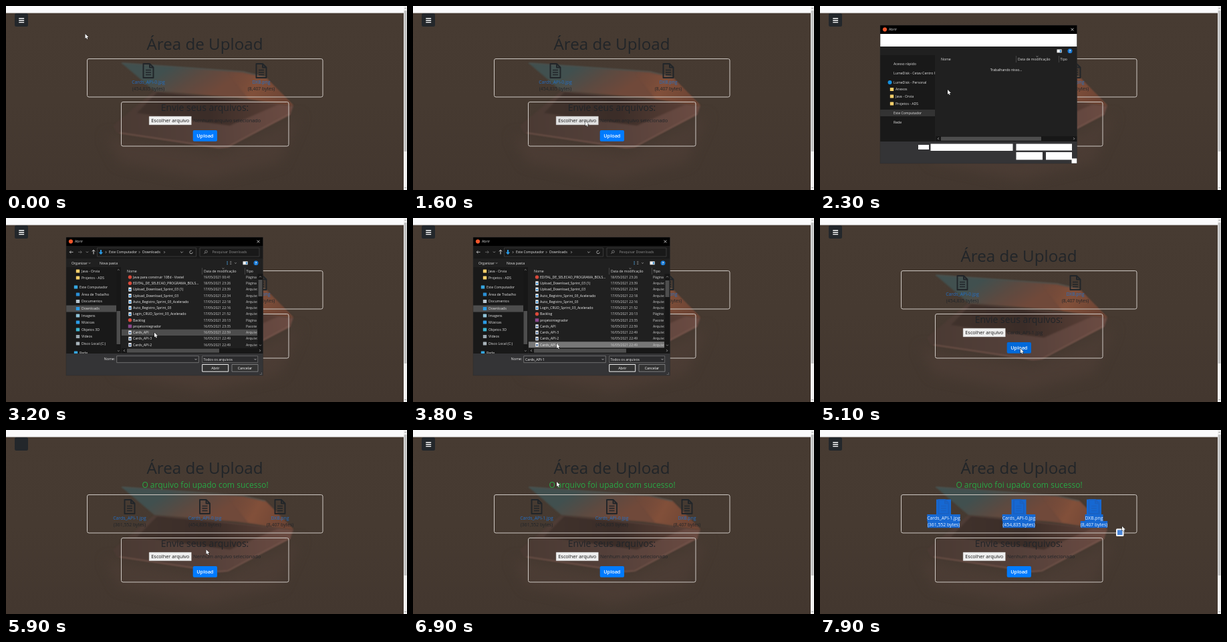
Recreate the animation shown at these times as an HTML page with a canvas. Size 600 by 277 pixels, loop 8 s.

```html
<!DOCTYPE html>
<html lang="pt-BR">
<head>
<meta charset="utf-8">
<title>Área de Upload</title>
<style>
  html, body { margin: 0; width: 100%; height: 100%; overflow: hidden; background: #463a31; }
  canvas { display: block; width: 600px; height: 277px; }
</style>
</head>
<body>
<canvas id="stage" width="600" height="277"></canvas>
<script>
const LOOP = 8000, STEP = 100;
const OPEN = 2000, CONTROLS = 2500, LISTED = 2800, CLOSE = 4200, CHOSEN = 4600, UPLOADED = 5800;
const INK = '#212529', SELECT = '#1668d2';
const canvas = document.getElementById('stage');
let c = canvas.getContext('2d');

// time, x, y of the pointer tip
const POINTER = [
  [0, 118.5, 42], [300, 97, 32], [900, 192, 100], [1400, 258, 173.5], [1900, 258, 173.5],
  [2300, 191, 126], [2700, 191, 126], [3200, 222, 172.5], [3500, 222, 174], [3700, 215, 189],
  [3800, 215, 189], [4100, 315, 223], [4300, 315.5, 220], [4900, 300, 197], [5700, 299, 194],
  [5900, 299.5, 180], [6600, 425, 135], [6900, 215, 78], [7000, 215, 78], [7300, 144, 100],
  [7700, 452, 145], [LOOP, 452, 145]
];

// name | date | type | icon
const FILES = `Java para construir 10Ed - Vostel|19/05/2021 00:41|Página|web
EDITAL_DE_SELECAO_PROGRAMA_BOLS...|18/05/2021 23:26|Página|web
Upload_Download_Sprint_03 (1)|17/05/2021 23:39|Arquivo|video
Upload_Download_Sprint_03|17/05/2021 22:34|Arquivo|video
Auto_Registro_Sprint_03_Acelerado|17/05/2021 22:18|Arquivo|video
Auto_Registro_Sprint_03|17/05/2021 22:16|Arquivo|video
Login_CRUD_Sprint_03_Acelerado|17/05/2021 21:52|Arquivo|video
Backlog|17/05/2021 20:13|Página|web
projetointegrador|16/05/2021 23:35|Pacote|zip
Cards_API|16/05/2021 22:59|Arquivo|image
Cards_API-3|16/05/2021 22:49|Arquivo|image
Cards_API-2|16/05/2021 22:49|Arquivo|image
Cards_API-1|16/05/2021 22:49|Arquivo|image`.split('\n').map(line => line.split('|'));

// label, x, y, icon colour
const PLACES_LOADING = [
  ['Acesso rápido', 110, 87], ['LumeDisk - Cetav Centro Paulo', 110, 101],
  ['LumeDisk - Personal', 110, 115, '#1490df', true], ['Anexos', 113, 125.5, '#f5cf6b'],
  ['Java - Orvia', 113, 136, '#f5cf6b'], ['Projetos - ADS', 113, 147, '#f5cf6b'],
  ['Este Computador', 110, 161], ['Rede', 110, 175]
];
const PLACES = [
  ['Java - Orvia', 113, 80, '#f5cf6b'], ['Projetos - ADS', 113, 90, '#f5cf6b'],
  ['Este Computador', 110, 104, '#35a6e0'], ['Área de Trabalho', 113, 115, '#2a8fd6'],
  ['Documentos', 113, 125.5, '#b9c6cf'], ['Downloads', 113, 136.5, '#2a9be6'],
  ['Imagens', 113, 147, '#8fc3d8'], ['Músicas', 113, 157, '#2a9be6'],
  ['Objetos 3D', 113, 168, '#3fb4cf'], ['Vídeos', 113, 178.5, '#9aa7b0'],
  ['Disco Local (C:)', 113, 189, '#a9b4bb'], ['Rede', 110, 203, '#35a6e0']
];

function rect(x, y, w, h, fill, radius = 0, stroke, lineWidth = 1) {
  c.beginPath();
  c.roundRect(x, y, w, h, radius);
  if (fill) { c.fillStyle = fill; c.fill(); }
  if (stroke) { c.strokeStyle = stroke; c.lineWidth = lineWidth; c.stroke(); }
}

function dot(x, y, r, fill) {
  rect(x - r, y - r, 2 * r, 2 * r, fill, r);
}

// y is the middle of the capitals
function text(s, x, y, size, color, align = 'left', weight = 400) {
  c.font = `${weight} ${size}px "Open Sans", sans-serif`;
  c.textAlign = align;
  c.fillStyle = color;
  c.fillText(s, x, y + size * 0.36);
}

function path(points, stroke, lineWidth = 1) {
  c.beginPath();
  points.forEach(([x, y]) => c.lineTo(x, y));
  c.strokeStyle = stroke;
  c.lineWidth = lineWidth;
  c.stroke();
}

function shape(points, fill) {
  c.beginPath();
  points.forEach(([x, y]) => c.lineTo(x, y));
  c.closePath();
  c.fillStyle = fill;
  c.fill();
}

function gradient(x0, y0, x1, y1, ...colors) {
  const g = c.createLinearGradient(x0, y0, x1, y1);
  colors.forEach((color, i) => g.addColorStop(i / (colors.length - 1), color));
  return g;
}

function clipped(x, y, w, h, draw) {
  c.save();
  c.beginPath();
  c.rect(x, y, w, h);
  c.clip();
  draw();
  c.restore();
}

function chevron(x, y, r, direction, color) {
  const turn = { down: [1, 0], right: [0, 1], left: [0, -1], up: [-1, 0] }[direction];
  const [v, h] = turn;
  path(v ? [[x - r, y - v * r / 2], [x, y + v * r / 2], [x + r, y - v * r / 2]]
         : [[x - h * r / 2, y - r], [x + h * r / 2, y], [x - h * r / 2, y + r]], color, 0.8);
}

function paintBackdrop() {
  const layer = document.createElement('canvas');
  layer.width = 600;
  layer.height = 277;
  const screen = c;
  c = layer.getContext('2d');
  rect(0, 0, 600, 277, gradient(0, 10, 0, 277, '#473b32', '#463a31', '#43372f'));
  c.filter = 'blur(9px)';
  shape([[150, 195], [320, 222], [440, 165], [410, 235], [300, 262], [170, 235]], '#4b3c34');
  c.filter = 'blur(1.2px)';
  shape([[160, 180], [222, 128], [430, 150], [425, 164], [330, 213], [316, 214], [166, 191]],
    gradient(165, 180, 425, 160, '#4a3a33', '#54403a', '#6b4b42'));
  shape([[226, 130], [408, 148], [335, 180], [196, 161]], gradient(200, 0, 410, 0, '#40322c', '#3b2d28', '#5a3f36'));
  shape([[173, 86], [355, 99], [388, 107], [430, 150], [345, 138], [222, 128]],
    gradient(250, 88, 290, 145, '#41504f', '#5b4a41', '#70493a'));
  shape([[330, 98], [388, 107], [430, 150], [362, 139]], gradient(330, 100, 415, 145, '#70493a00', '#82503a', '#6d4434'));
  path([[173, 86], [355, 99], [388, 107]], '#506160', 1);
  path([[170, 191], [318, 213], [332, 212], [425, 162]], '#77574d', 1.5);
  c = screen;
  return layer;
}
const backdrop = paintBackdrop();

function documentIcon(x, y, color) {
  c.lineJoin = 'round';
  path([[x + 2, y - 10.5], [x - 7.5, y - 10.5], [x - 7.5, y + 10.5], [x + 7.5, y + 10.5],
    [x + 7.5, y - 5], [x + 2, y - 10.5], [x + 2, y - 5], [x + 7.5, y - 5]], color, 1.9);
  for (const dy of [-1, 2.5, 6]) path([[x - 4, y + dy], [x + 4, y + dy]], color, 1.5);
}

function uploadedFile(name, bytes, x, y, selected) {
  if (selected) {
    rect(x - 11, y - 11, 22, 23, SELECT);
    [[name, 11.5], [bytes, 21.5]].forEach(([s, dy]) => {
      c.font = '6.9px "Open Sans", sans-serif';
      const w = c.measureText(s).width;
      rect(x - w / 2, y + dy, w, 10.2, SELECT);
    });
  }
  documentIcon(x, y, selected ? '#1a61c2' : INK);
  text(name, x, y + 16.7, 6.9, selected ? '#eef5ff' : '#236fc4', 'center');
  text(bytes, x, y + 26.8, 6.9, selected ? '#eef5ff' : INK, 'center');
}

function drawPage(t, pointer) {
  const done = t >= UPLOADED, shift = done ? 18 : 0;
  c.drawImage(backdrop, 0, 0);
  rect(0, 0, 600, 10.5, '#fbfbfc');
  rect(0, 9.8, 595, 0.8, '#dcdcdc');
  rect(595, 0, 5, 277, '#f1f1f1');
  rect(595.7, 7, 3.8, 212, '#c1c1c1');
  chevron(597.6, 3.5, 1.2, 'up', '#777');
  chevron(597.6, 273.5, 1.2, 'down', '#777');

  rect(13, 11, 20, 20, '#23272b', 2.5);
  if (t < UPLOADED || t >= 6000)
    for (const y of [18.2, 21.1, 24]) rect(19.2, y - 0.1, 8, 1.4, '#fff', 0.5);

  text('Área de Upload', 297.5, 57, 24.2, INK, 'center');
  if (done) text('O arquivo foi upado com sucesso!', 298, 82.3, 12, '#28a745', 'center', 500);

  const frame = '#cfc9c4';
  rect(121.5, 79.5 + shift, 352.5, 57.5, null, 2.5, frame);
  rect(172.5, 144.5 + shift, 250.5, 66.5, null, 2.5, frame);

  const y = 97.5 + shift;
  if (done) {
    const reached = x => t >= 7300 && pointer[0] > x;
    uploadedFile('Cards_API-1.jpg', '(361,552 bytes)', 185, y, reached(185));
    uploadedFile('Cards_API-0.jpg', '(454,835 bytes)', 297.5, y, reached(297));
    uploadedFile('DXB.png', '(8,407 bytes)', 410, y, reached(410));
  } else {
    uploadedFile('Cards_API-0.jpg', '(454,835 bytes)', 213, y);
    uploadedFile('DXB.png', '(8,407 bytes)', 382, y);
  }

  text('Envie seus arquivos:', 297.5, 153 + shift, 14, INK, 'center', 500);
  const touched = t >= 1400 && t < 4900;
  rect(214, 166 + shift, 63.5, 13, touched ? '#e2e2e2' : '#efefef', 0.5, '#8a8581', 0.5);
  text('Escolher arquivo', 245.7, 172.7 + shift, 7.35, '#111', 'center');
  const chosen = t >= CHOSEN && !done;
  text(chosen ? 'Cards_API-1.jpg' : 'Nenhum arquivo selecionado', 280, 172.7 + shift, 7.4, INK);

  const pressed = t >= 5500 && !done;
  if (pressed) rect(278.8, 186.3, 38, 18, '#007bff80', 3);
  rect(279.7, 187 + shift, 36.3, 16.7, t >= 4900 && !done ? '#0069d9' : '#007bff', 2);
  text('Upload', 297.8, 195.2 + shift, 7.3, '#fff', 'center', 600);
}

function fileIcon(kind, x, y) {
  if (kind === 'web') return dot(x, y, 2.7, '#d9493a');
  if (kind === 'zip') return rect(x - 2.7, y - 2.5, 5.4, 5, '#8c4a8f');
  rect(x - 2.2, y - 2.9, 4.4, 5.8, '#f2f2f2');
  rect(x - 1.3, y - 0.8, 2.6, 2.4, kind === 'video' ? '#2f8fdb' : '#4b6f9e');
}

function drawSidebar(listed) {
  rect(90, 74, 82, 130, '#191919');
  rect(90, listed ? 131.5 : 156, listed ? 75 : 82, 10, listed ? '#4d4d4d' : '#333');
  clipped(90, 74, listed ? 75 : 82, 130, () => {
    for (const [label, x, y, color, round] of listed ? PLACES : PLACES_LOADING) {
      const iconX = x - 5.5;
      if (round) dot(iconX, y, 3, color);
      else if (color) rect(iconX - 2.7, y - 2.5, 5.4, 5, color, 0.6);
      text(label, x, y, 5.2, '#e4e4e4');
    }
  });
  if (listed) {
    rect(165, 74, 7, 130, '#171717');
    rect(165.5, 140, 5.5, 50, '#4d4d4d');
    chevron(168.3, 78, 1.4, 'up', '#999');
    chevron(168.3, 200, 1.4, 'down', '#999');
  }
}

function drawList(t, listed) {
  rect(172, 74, 212.5, 130, '#202020');
  if (listed) {
    const scroll = t >= 3500 ? 1 : 0;
    const active = t >= 3700 ? 12 : t >= 3100 ? 9 + scroll : -1;
    clipped(173, 84.5, 203, 111, () => FILES.forEach(([name, date, type, kind], i) => {
      const y = 89 + (i - scroll) * 9.26;
      if (y < 88) return;
      if (i === active) rect(173, y - 4.6, 203, 9.2, t >= 3700 ? '#777' : '#4d4d4d');
      fileIcon(kind, 185.5, y);
      text(name, 190, y, 5.1, '#f0f0f0');
      text(date, 295.5, y, 5, '#d0d0d0');
      text(type, 359, y, 5.1, '#d0d0d0');
    }));
    rect(376.5, 84, 8, 112, '#171717');
    rect(377.5, 93 + scroll, 6, 25, '#4d4d4d');
    chevron(380.5, 88.5, 1.5, 'up', '#999');
    chevron(380.5, 191.5, 1.5, 'down', '#999');
  } else {
    text('Trabalhando nisso...', 278.5, 95.7, 5.1, '#f0f0f0', 'center');
  }
  text('Nome', 181, 80, 5.2, '#dedede');
  text('Data de modificação', 296, 80, 5.1, '#dedede');
  text('Tipo', 359.5, 80, 5.2, '#dedede');
  for (const x of [293, 357]) rect(x, 75, 0.7, 10, '#555');
  chevron(325, 76, 1.3, 'down', '#aaa');
  rect(173, 196, 211.5, 8, '#171717');
  rect(181, 196.7, listed ? 138 : 150, 6, '#4d4d4d');
  chevron(177, 199.7, 1.5, 'left', '#bbb');
  chevron(380, 199.7, 1.5, 'right', '#bbb');
}

function drawToolbar(ready) {
  rect(90, 42, 294.5, 19.5, ready ? '#191919' : '#fff');
  rect(90, 61, 294.5, 13, '#202020');
  rect(354.5, 65.3, 7.2, 5, '#f0f0f0');
  rect(358.8, 66.3, 2.2, 3.2, '#3f8fd0');
  dot(374, 67.7, 3.5, '#1678d4');
  text('?', 374, 67.7, 5.4, '#fff', 'center', 700);
  if (!ready) return;

  path([[100.5, 51.3], [95.5, 51.3]], '#ddd', 0.8);
  chevron(96.2, 51.3, 2, 'left', '#ddd');
  path([[108, 51.3], [113, 51.3]], '#777', 0.8);
  chevron(112.3, 51.3, 2, 'right', '#777');
  chevron(121.5, 51.3, 1.5, 'down', '#aaa');
  path([[131, 54.5], [131, 48.5]], '#eee', 0.9);
  chevron(131, 49.2, 2.3, 'up', '#eee');
  rect(136.5, 45, 148, 13, '#191919', 0, '#454545', 0.7);
  path([[142, 48], [142, 53]], '#2a9be6', 2);
  shape([[138.8, 51.5], [145.2, 51.5], [142, 55.2]], '#2a9be6');
  text('Este Computador', 154, 51.5, 5.2, '#e8e8e8');
  text('Downloads', 204, 51.5, 5.2, '#e8e8e8');
  for (const x of [149.5, 199.5, 237]) chevron(x, 51.5, 1.4, 'right', '#bbb');
  chevron(263, 51.5, 1.8, 'down', '#bbb');
  c.beginPath();
  c.arc(277, 51.5, 2.2, 0, 5.2);
  c.lineWidth = 0.8;
  c.stroke();
  rect(290, 45, 89, 13, '#191919', 0, '#454545', 0.7);
  c.beginPath();
  c.arc(299.5, 50.7, 1.8, 0, 7);
  c.strokeStyle = '#999';
  c.stroke();
  path([[298.2, 52], [296.3, 53.9]], '#999', 0.8);
  text('Pesquisar Downloads', 308.5, 51.5, 5.2, '#8c8c8c');

  text('Organizar', 98, 67.7, 5.2, '#e8e8e8');
  chevron(125, 67.9, 1.2, 'down', '#bbb');
  text('Nova pasta', 140, 67.7, 5.2, '#e8e8e8');
  for (const y of [65, 67, 69]) {
    rect(330.5, y, 1.2, 1.2, '#4aa0dd');
    rect(335, y, 2.4, 1, '#777');
  }
  chevron(343.5, 67.9, 1.2, 'down', '#bbb');
}

function drawFooter(t, ready) {
  rect(90, 204, 294.5, 33, '#343436');
  if (!ready) {
    const blank = [[147, 209, 16, 7], [165.5, 207.5, 123, 10.5], [293.5, 207.5, 83.5, 10],
      [293.5, 220, 39.5, 11.5], [338, 220, 39, 11.5], [376.5, 229.5, 8, 7.5]];
    blank.forEach(([x, y, w, h]) => rect(x, y, w, h, '#fff'));
    return;
  }
  text('Nome:', 163, 212.5, 5.2, '#eee', 'right');
  rect(165.7, 207.7, 122.6, 10, '#2b2b2d', 0, '#8a8a8a', 0.7);
  if (t >= 3700) text('Cards_API-1', 168, 212.7, 5.2, '#fff');
  chevron(284, 212.7, 1.5, 'down', '#ccc');
  rect(293.7, 207.7, 83, 10, '#2b2b2d', 0, '#777', 0.7);
  text('Todos os arquivos', 295.5, 212.7, 5.2, '#eee');
  chevron(373, 212.7, 1.5, 'down', '#ccc');
  rect(293.7, 220.5, 39, 10.7, '#333', 0, '#f0f0f0', 1);
  text('Abrir', 313.3, 225.8, 5.3, '#fff', 'center');
  rect(338, 220.5, 39, 10.7, '#333', 0, '#999', 0.7);
  text('Cancelar', 357.5, 225.8, 5.3, '#fff', 'center');
  for (const [x, y] of [[382, 235], [380, 235], [382, 233]]) rect(x, y, 1, 1, '#888');
}

function drawDialog(t) {
  const ready = t >= CONTROLS, listed = t >= LISTED;
  rect(90, 29, 294.5, 13, '#000');
  dot(97, 35.3, 3.1, '#f0562b');
  text('Abrir', 103, 35.6, 5.2, '#ddd');
  path([[375.6, 33.5], [379.4, 37.3]], '#eee', 0.8);
  path([[379.4, 33.5], [375.6, 37.3]], '#eee', 0.8);
  drawToolbar(ready);
  drawSidebar(listed);
  drawList(t, listed);
  drawFooter(t, ready);
  rect(90, 29, 294.5, 208, null, 0, '#2a2a2a', 0.5);
}

function pointerAt(t) {
  const i = POINTER.findIndex(key => key[0] > t);
  const [t0, x0, y0] = POINTER[i - 1], [t1, x1, y1] = POINTER[i];
  const p = (t - t0) / (t1 - t0), eased = p * p * (3 - 2 * p);
  return [x0 + (x1 - x0) * eased, y0 + (y1 - y0) * eased];
}

function drawPointer([x, y]) {
  const outline = [[0, 0], [0, 7], [1.6, 5.6], [2.7, 8], [3.8, 7.5], [2.8, 5.1], [5, 5]]
    .map(([dx, dy]) => [x + dx, y + dy]);
  path([...outline, outline[0]], '#111', 0.9);
  shape(outline, '#fff');
}

function draw(t) {
  const pointer = pointerAt(t);
  drawPage(t, pointer);
  if (t >= OPEN && t < CLOSE) drawDialog(t);
  if (t >= 7700) {
    rect(443, 148.5, 11.5, 11.5, '#f4f6f9', 1.5);
    rect(445, 150.5, 7.5, 7.5, '#4a86d8');
  }
  drawPointer(pointer);
}

function tick(now) {
  draw(Math.floor(now % LOOP / STEP) * STEP);
  requestAnimationFrame(tick);
}
requestAnimationFrame(tick);
</script>
</body>
</html>
```
